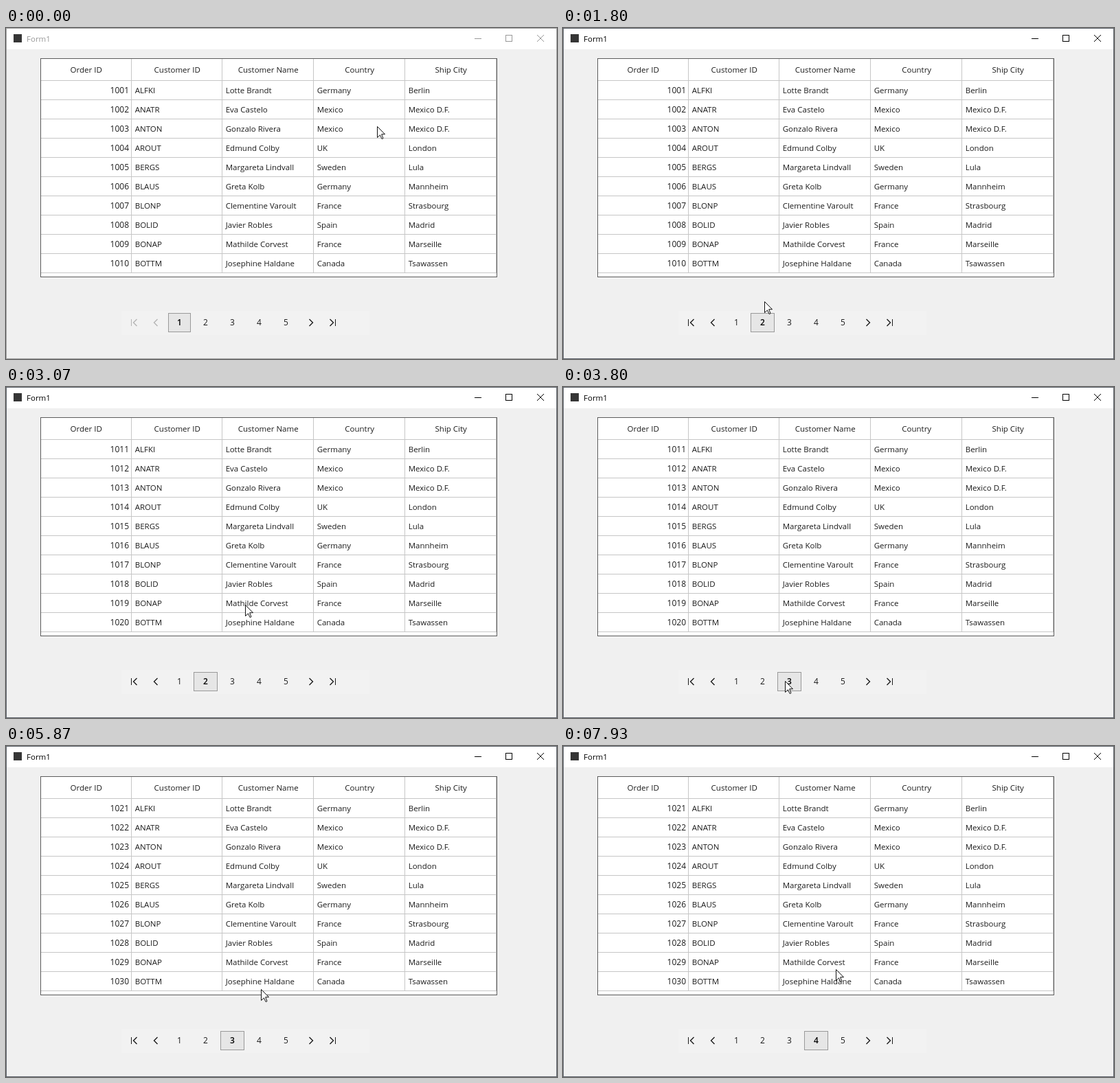
An HTML page with a canvas that plays this animation: 802x482 px, repeating every 8000 ms.

```html
<!DOCTYPE html>
<html>
<head>
<meta charset="utf-8">
<style>
html, body { margin: 0; width: 100%; height: 100%; overflow: hidden; background: #f0f0f0; }
canvas { display: block; }
</style>
</head>
<body>
<canvas id="stage" width="802" height="482"></canvas>
<script>
const c = document.getElementById('stage').getContext('2d');
const FONT = '"Open Sans", "Noto Sans", sans-serif';
const INK = '#1c1c1c';
const LOOP = 8000, TICK = 200 / 3;

const headers = ['Order ID', 'Customer ID', 'Customer Name', 'Country', 'Ship City'];
const rows = `ALFKI,Lotte Brandt,Germany,Berlin
ANATR,Eva Castelo,Mexico,Mexico D.F.
ANTON,Gonzalo Rivera,Mexico,Mexico D.F.
AROUT,Edmund Colby,UK,London
BERGS,Margareta Lindvall,Sweden,Lula
BLAUS,Greta Kolb,Germany,Mannheim
BLONP,Clementine Varoult,France,Strasbourg
BOLID,Javier Robles,Spain,Madrid
BONAP,Mathilde Corvest,France,Marseille
BOTTM,Josephine Haldane,Canada,Tsawassen`.split('\n').map(row => row.split(','));
const columnX = i => Math.floor(49.25 + 132.75 * i);

// Page buttons sit 39 px apart; the first is cut off at the left
const pages = headers.map((_, i) => ({ left: Math.max(236, 234 + 39 * i), right: 269 + 39 * i }));
const next = { left: 430, right: 458 };

// All times below are in ticks of 1/15 s
const ACTIVATE = 12, PRESS = 100, SPIN_DELAY = 14, LOAD_DELAY = 29;
const clicks = [14, 57, 106];
const moves = [
  { from: 0, to: 12, x: 283, y: 424 },
  { from: 26, to: 32.5, x: 350, y: 258 },
  { from: 42, to: 46, x: 348, y: 317 },
  { from: 46, to: 53, x: 323, y: 428 },
  { from: 61, to: 72, x: 364, y: 257 },
  { from: 84, to: 88, x: 371, y: 354 },
  { from: 88, to: 95, x: 438, y: 424 },
  { from: 113, to: 119, x: 397, y: 325 }
];

function rect(x, y, w, h, fill) {
  c.fillStyle = fill;
  c.fillRect(x, y, w, h);
}

function frame(x, y, w, h, color) {
  c.lineWidth = 1;
  c.strokeStyle = color;
  c.strokeRect(x + 0.5, y + 0.5, w - 1, h - 1);
}

function text(str, x, y, align = 'left', color = INK, size = 11.5, weight = 400) {
  c.font = `${weight} ${size}px ${FONT}`;
  c.textAlign = align;
  c.fillStyle = color;
  c.fillText(str, x, y);
}

function line(color, width, ...points) {
  c.strokeStyle = color;
  c.lineWidth = width;
  c.beginPath();
  for (const [x, y] of points) c.lineTo(x, y);
  c.stroke();
}

function cursorAt(k) {
  let x = 540, y = 143;
  for (const m of moves) {
    const f = Math.min(1, Math.max(0, (k - m.from) / (m.to - m.from)));
    x += (m.x - x) * f;
    y += (m.y - y) * f;
  }
  return [Math.round(x), Math.round(y)];
}

function drawWindow(active) {
  const ink = active ? '#000' : '#999';
  rect(0, 0, 802, 482, '#f0f0f0');
  rect(0, 0, 802, 31, '#fff');
  frame(0, 0, 802, 482, active ? '#5f646c' : '#a0a0a0');
  rect(11, 9, 12, 12, '#363636');
  text('Form1', 30, 20, 'left', ink);
  rect(682, 15, 10, 1, ink);
  frame(727, 10, 10, 10, ink);
  line(ink, 1, [773, 10], [783, 20]);
  line(ink, 1, [783, 10], [773, 20]);
}

function drawGrid(firstId) {
  rect(50, 44, 665, 319, '#fff');
  for (let y = 76; y <= 356; y += 28) rect(51, y, 663, 1, '#c6c6c6');
  headers.forEach((label, i) => {
    const left = columnX(i), right = columnX(i + 1);
    rect(right, 45, 1, 312, '#c6c6c6');
    text(label, (left + right) / 2 + 1.2, 65, 'center');
  });
  frame(50, 44, 665, 319, '#5c5c5c');
  rows.forEach((cells, r) => {
    const y = 95 + 28 * r;
    text(firstId + r, 179, y, 'right', INK, 12);
    cells.forEach((cell, i) => text(cell, columnX(i + 1) + 5.7, y));
  });
}

function chevron(x, dir, color) {
  line(color, 1.4, [x - 2.5 * dir, 424], [x + 2.5 * dir, 429], [x - 2.5 * dir, 434]);
}

function drawPager(k, page, [mx, my]) {
  const inside = b => mx >= b.left && mx < b.right && my >= 415 && my < 443;
  const fill = (b, shade) => rect(b.left, 415, b.right - b.left, 28, `rgb(${shade},${shade},${shade})`);
  rect(168, 412, 361, 35, '#f2f2f2');
  pages.forEach((b, i) => {
    const selected = i === page;
    if (selected || inside(b)) fill(b, 230);
    if (selected) frame(b.left, 415, b.right - b.left, 28, '#999');
    text(i + 1, (b.left + b.right) / 2, 433, 'center', selected ? '#000' : INK, 12, selected ? 600 : 400);
  });
  if (inside(next)) {
    const pressed = k >= PRESS && k < clicks[2] ? Math.min(1, (k - PRESS + 1) / 5) : 0;
    fill(next, 230 - 22 * pressed);
  }
  const back = page ? INK : '#b4b4b4';
  rect(182, 424, 1, 10, back);
  chevron(188, -1, back);
  chevron(218, -1, back);
  chevron(444, 1, INK);
  chevron(474, 1, INK);
  rect(479, 424, 1, 10, INK);
}

function drawSpinner(k) {
  c.save();
  c.translate(382, 203);
  c.rotate((k - 73) * Math.PI / 6);
  for (let i = 0; i < 12; i++) {
    c.globalAlpha = (1 - i / 12) ** 1.6;
    rect(-1.25, -16.5, 2.5, 7, '#0a73c4');
    c.rotate(-Math.PI / 6);
  }
  c.restore();
}

function drawCursor([x, y]) {
  c.save();
  c.translate(x + 0.5, y + 0.5);
  c.beginPath();
  for (const [px, py] of [[0, 0], [0, 16], [4, 12.4], [6.6, 18], [8.5, 17.2], [6.2, 11.2], [11, 11.2]]) c.lineTo(px, py);
  c.closePath();
  c.fillStyle = '#fff';
  c.fill();
  c.lineWidth = 1;
  c.strokeStyle = '#111';
  c.stroke();
  c.restore();
}

function draw(now) {
  const k = Math.floor(((now % LOOP) + 5) / TICK) % 120;
  const page = clicks.filter(t => k >= t).length;
  const loaded = clicks.filter(t => k >= t + LOAD_DELAY).length;
  const mouse = cursorAt(k);
  drawWindow(k >= ACTIVATE);
  drawGrid(1001 + 10 * loaded);
  drawPager(k, page, mouse);
  if (clicks.some(t => k >= t + SPIN_DELAY && k < t + LOAD_DELAY)) drawSpinner(k);
  drawCursor(mouse);
}

const start = performance.now();
function loop() {
  draw(performance.now() - start);
  requestAnimationFrame(loop);
}
loop();
</script>
</body>
</html>
```
